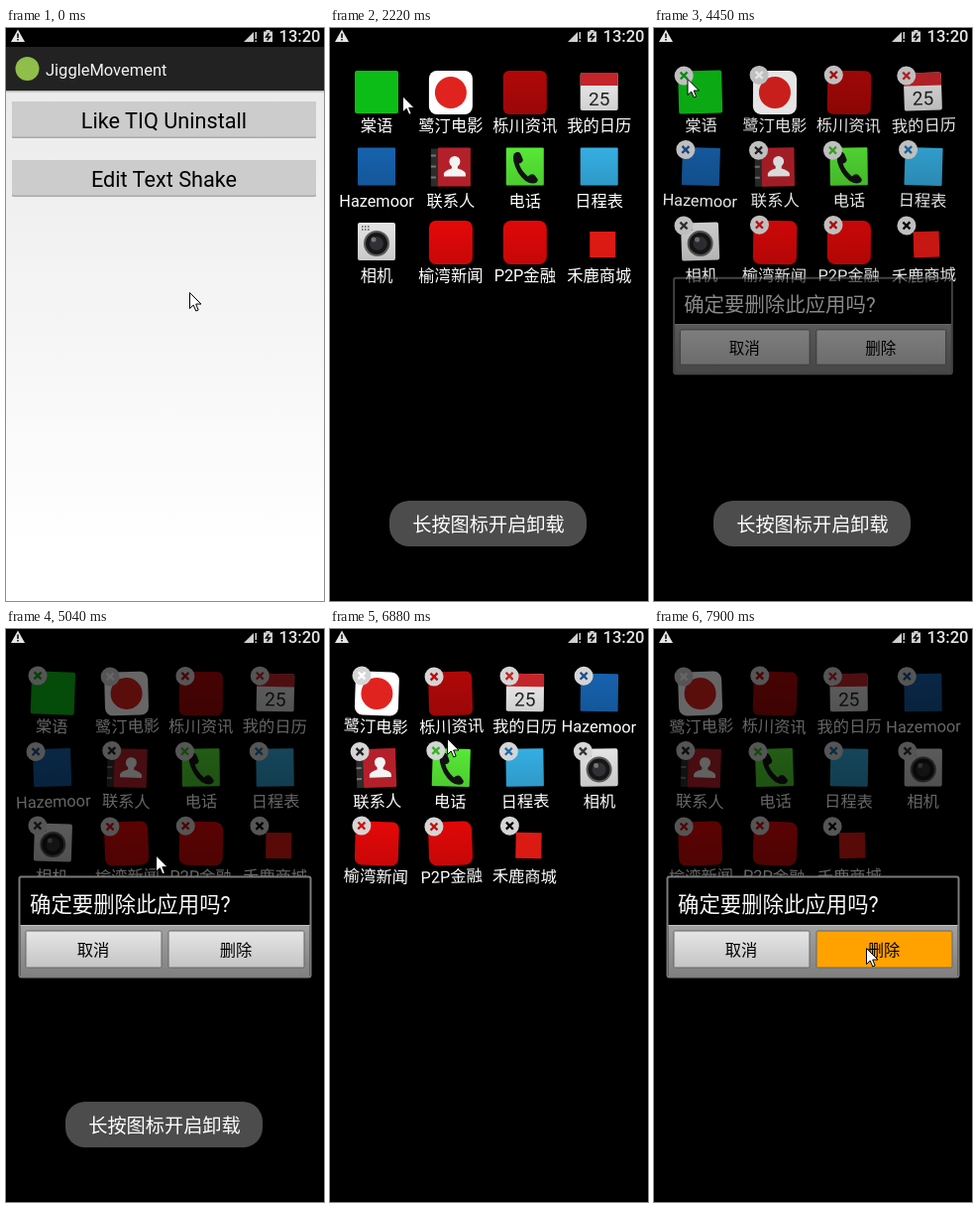
These frames come from a looping animation (321 by 577 pixels, 8000 ms). An HTML page:

```html
<!DOCTYPE html>
<html lang="zh-CN">
<head>
<meta charset="utf-8">
<title>Icon wobble</title>
<style>
  html, body { margin: 0; width: 100%; height: 100%; overflow: hidden; background: #000; }
  svg { display: block; width: 321px; height: 577px; }
  text { font-family: Roboto, "Noto Sans CJK SC", "Noto Sans CJK", sans-serif; }
  .mid { text-anchor: middle; }
  .label { font-size: 16.3px; fill: #fff; text-anchor: middle; }
</style>
</head>
<body>
<svg viewBox="0 0 321 577">
  <defs>
    <linearGradient id="page" x2="0" y2="1"><stop stop-color="#e9e9e9"/><stop offset=".9" stop-color="#fff"/></linearGradient>
    <linearGradient id="key" x2="0" y2="1"><stop stop-color="#e6e6e6"/><stop offset="1" stop-color="#c4c4c4"/></linearGradient>
    <linearGradient id="panel" x2="0" y2="1"><stop stop-color="#a2a2a2"/><stop offset="1" stop-color="#808080"/></linearGradient>
    <linearGradient id="shade" x2="0" y2="1"><stop stop-opacity="0"/><stop offset="1" stop-opacity=".12"/></linearGradient>
  </defs>

  <g id="home">
    <rect y="19" width="321" height="558" fill="url(#page)"/>
    <rect y="19" width="321" height="44" fill="#222"/>
    <rect y="63" width="321" height="1.5" fill="#b5b5b5"/>
    <circle cx="21.5" cy="41" r="12" fill="#8fbe4a"/>
    <text x="40" y="48" font-size="16.5" fill="#f3f3f3">JiggleMovement</text>
    <g id="buttons"></g>
  </g>

  <g id="screen">
    <rect y="19" width="321" height="577"/>
    <g id="apps"></g>
  </g>

  <rect id="dim" y="19" width="321" height="558"/>

  <g id="dialog">
    <rect x="13.5" y="249.5" width="294" height="101" rx="2" stroke="#7b7b7b" stroke-width="2"/>
    <text x="24" y="285" font-size="21.4" fill="#f8f8f8">确定要删除此应用吗?</text>
    <rect x="14.5" y="298" width="292" height="52" fill="url(#panel)"/>
    <rect x="14.5" y="298" width="292" height="1" fill="#c4c4c4"/>
    <g stroke="#666">
      <rect x="20" y="304" width="137" height="37" rx="1.5" fill="url(#key)"/>
      <rect id="remove" x="164" y="304" width="137" height="37" rx="1.5"/>
    </g>
    <text class="mid" x="88" y="329" font-size="16.3">取消</text>
    <text class="mid" x="232" y="329" font-size="16.3">删除</text>
  </g>

  <g id="toast">
    <rect x="60" y="476" width="199" height="46" rx="20" fill="#4c4c4c"/>
    <text class="mid" x="160" y="506.5" font-size="19.2" fill="#fff">长按图标开启卸载</text>
  </g>

  <g id="status">
    <rect width="321" height="19"/>
    <path d="M12 1.5 19 14H5Z" fill="#e6e6e6"/>
    <path d="M12 5.5V10M12 11V12.500" stroke="#000" stroke-width="1.5"/>
    <path d="M240 14 250 4V14ZM251.500 4H253V11H251.500ZM251.500 12.500H253V14H251.500Z" fill="#d0d0d0"/>
    <path d="M260 3.500H262.500V2H266.500V3.500H269V14H260Z" fill="#d0d0d0"/>
    <path d="M265.500 5 262.500 9H266.500L263.500 12.500" fill="none" stroke="#000" stroke-width="1.500"/>
    <text x="275.500" y="14" font-size="16.500" font-weight="500" fill="#e6e6e6">13:20</text>
  </g>

  <path id="cursor" d="M.5.5V16.500L4.200 13 6.800 19 9.200 18 6.700 12H12Z" fill="#fff" stroke="#000" stroke-width="1"/>
</svg>

<script>
const $ = id => document.getElementById(id);

// Icons are drawn in a 44 x 44 box.
const tile = (fill, inset = 3, r = 1, size = 44 - inset * 2) =>
  [fill, 'url(#shade)'].map(f =>
    `<rect x="${inset}" y="${inset - (inset ? 1 : 0)}" width="${size}" height="${size}" rx="${r}" fill="${f}"/>`).join('');

const calendar = tile('#ededed', 3, 2) +
  '<path d="M3 4Q3 2 5 2H39Q41 2 41 4V15H3Z" fill="#c4252a"/>' +
  '<text class="mid" x="22" y="34.5" font-size="19" fill="#222">25</text>';

const contacts = '<rect x="2" y="3" width="9" height="38" fill="#2c2c2c"/>' +
  '<path d="M2 10H7M2 21H7M2 32H7" stroke="#777" stroke-width="2"/>' +
  '<rect x="9" y="2" width="33" height="39" rx="1" fill="#b3202a"/>' +
  '<circle cx="26" cy="16" r="5.5" fill="#f3f3f3"/>' +
  '<path d="M15 31V28Q16 25 23 23V20H29V23Q36 25 37 28V31Z" fill="#f3f3f3"/>';

const phone = tile('#57e836') +
  '<path d="M11 8Q16 4 18 9L20 14Q20 17 16 18Q18 25 25 31Q29 27 32 30L35 34Q35 38 30 38Q22 38 15 27Q8 14 11 8Z" fill="#111"/>';

const camera = tile('#e4e4e4', 3, 2) +
  '<path d="M7 6H15M7 9H15" stroke="#555" stroke-width="1.5" stroke-dasharray="1.5"/>' +
  '<circle cx="22" cy="23" r="13" fill="#5a5a5a"/><circle cx="22" cy="23" r="11" fill="#161616"/>' +
  '<circle cx="22" cy="23" r="7" fill="#303036"/><circle cx="19" cy="19" r="2.5" fill="#777"/>';

// label, icon, colour seen through the badge cross
const APPS = [
  ['棠语', '<rect width="44" height="43" rx="2" fill="#0cbd17"/>', '#0a9c14'],
  ['鹭汀电影', '<rect width="44" height="44" rx="8" fill="#fff"/><circle cx="22" cy="22" r="16" fill="#e0231f"/>', '#fff'],
  ['栎川资讯', tile('#b00808', 0, 6), '#b80f10'],
  ['我的日历', calendar, '#c4252a'],
  ['Hazemoor', tile('#1762ae'), '#1c4f91'],
  ['联系人', contacts, '#222'],
  ['电话', phone, '#35b521'],
  ['日程表', tile('#35aee2'), '#1f6da8'],
  ['相机', camera, '#333'],
  ['榆湾新闻', tile('#e40808', 0, 7), '#d01212'],
  ['P2P金融', tile('#e00808', 0, 8), '#c01010'],
  ['禾鹿商城', '<rect x="12.500" y="11" width="26" height="26" fill="#dc1a14"/>', '#000'],
];

$('buttons').innerHTML = [['Like TIQ Uninstall', 74], ['Edit Text Shake', 133]].map(([label, y]) =>
  `<rect x="6" y="${y}" width="307" height="37" rx="1.5" fill="#a9a9a9"/>
   <rect x="6" y="${y}" width="307" height="35.5" rx="1.5" fill="#ccc"/>
   <text class="mid" x="159.5" y="${y + 26.5}" font-size="21.7">${label}</text>`).join('');

$('apps').innerHTML = APPS.map(([label, icon, cross]) =>
  `<g>${icon}<text class="label" x="22" y="61">${label}</text>
   <g class="badge"><circle cx="6" cy="4.5" r="9.5" fill="#d5d5d5"/>
   <path d="M2.500 1 9.500 8M9.500 1 2.500 8" stroke="${cross}" stroke-width="2.300"/></g></g>`).join('');

const tiles = [...$('apps').children];
const badges = [...document.querySelectorAll('.badge')];

// Keys are [tick, value, ...]; values are interpolated linearly.
const CURSOR = [
  [0, 185, 266], [1, 181, 225], [2, 171, 140], [3, 158, 73], [4, 155, 100], [7, 155, 100],
  [9, 110, 85], [12, 54.5, 60], [18, 54.5, 60], [20, 33.5, 51], [22, 33.5, 51], [25, 210, 316],
  [26, 214, 321], [27, 214, 321], [29, 171, 169], [34, 118, 110], [35, 107, 49],
  [36, 107, 49], [38, 207, 315], [39, 214, 321]];
const DIALOG = [[21, 0], [22, .55], [23, 1], [26, 1], [28, 0], [35, 0], [36, .55], [37, 1]];
const DIM = [[21, 0], [22, .1], [23, .6], [26, .6], [28, 0], [35, 0], [36, .1], [37, .6]];
const TOAST = [[8, 0], [10, 1], [24, 1], [26, 0]];
const OPEN = [[6, 0], [7, .86], [8, 1]];

function at(keys, k) {
  const i = keys.findIndex(key => key[0] > k);
  if (i === 0) return keys[0].slice(1);
  if (i < 0) return keys[keys.length - 1].slice(1);
  const a = keys[i - 1], b = keys[i], p = (k - a[0]) / (b[0] - a[0]);
  return a.slice(1).map((v, n) => v + (b[n + 1] - v) * p);
}

const fade = (id, value) => $(id).setAttribute('opacity', value);
const move = (el, value) => el.setAttribute('transform', value);

function draw(k) {
  const [open] = at(OPEN, k), [shown] = at(DIALOG, k);
  const editing = k >= 15, removed = k >= 28 ? 1 : 0;
  const resting = !editing || k === 28 || k === 29;

  fade('screen', open);
  move($('screen'), `translate(0 ${(1 - open) * 100})`);
  tiles.forEach((el, n) => {
    const i = n - removed;
    el.style.display = i < 0 ? 'none' : '';
    const x = 25 + i % 4 * 74.9, y = 43 + Math.floor(i / 4) * 75.5;
    const angle = resting ? 0 : 2 * Math.sin(1.9 * k + 2.4 * i);
    move(el, `translate(${x} ${y}) rotate(${angle} 22 33)`);
  });
  badges.forEach(el => el.style.display = editing ? '' : 'none');

  fade('dim', at(DIM, k)[0]);
  fade('toast', at(TOAST, k)[0]);
  fade('dialog', shown);
  move($('dialog'), `translate(160.5 300) scale(${.9 + .1 * shown}) translate(-160.5 -300)`);
  const pressed = k === 26 || k === 27 || k === 39;
  $('remove').setAttribute('fill', pressed ? '#ffa200' : 'url(#key)');
  move($('cursor'), `translate(${at(CURSOR, k)})`);
}

const LOOP = 8000, TICK = 202.5, LEAD = 15;
const start = performance.now();
function frame() {
  const t = (performance.now() - start) % LOOP;
  draw(Math.min(39, Math.floor((t + LEAD) / TICK)));
  requestAnimationFrame(frame);
}
frame();
</script>
</body>
</html>
```
